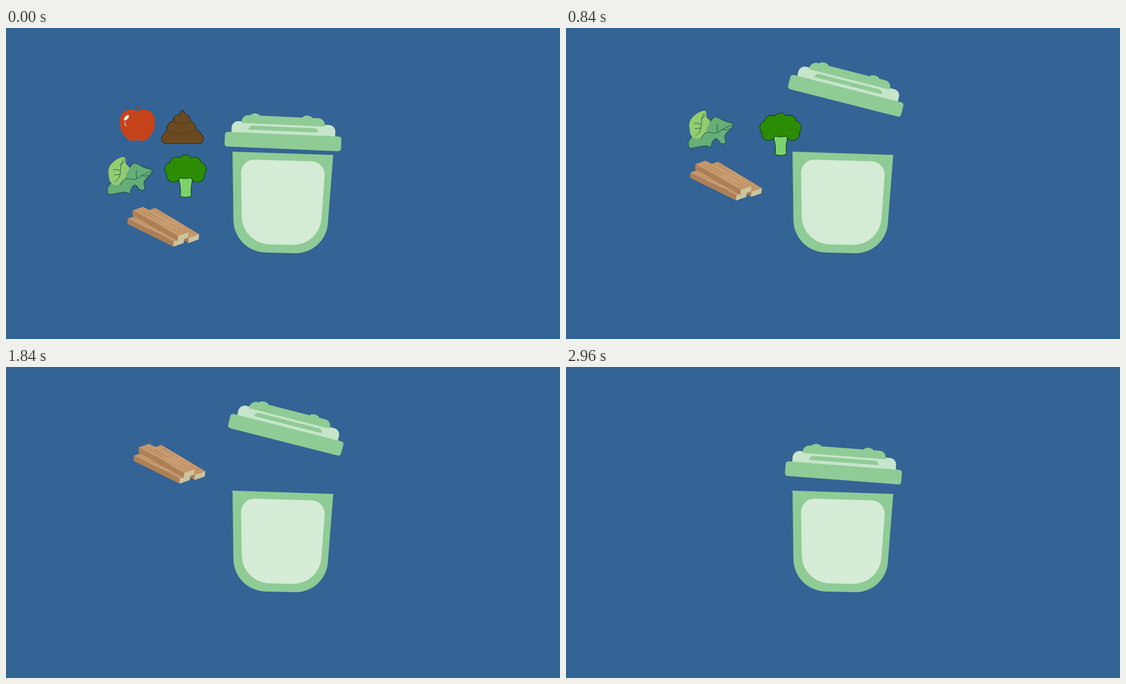
These frames come from a looping animation (998 by 561 pixels, 3 s). An HTML page with a canvas:

```html
<!DOCTYPE html>
<html lang="en">
<head>
<meta charset="utf-8">
<title>Compost bin</title>
<style>
  html, body { margin: 0; height: 100%; overflow: hidden; background: #346395; }
  canvas { display: block; }
</style>
</head>
<body>
<canvas id="stage" width="998" height="561"></canvas>
<script>
const ctx = document.getElementById("stage").getContext("2d");
const LOOP = 3000, STEP = 40, DROP_TIME = 200, DROP = 92;
const GREEN = "#8fcb95";

const mix = (a, b, k) => a + (b - a) * k;
const clamp = v => Math.max(0, Math.min(1, v));
const noise = n => { const v = Math.sin(n * 12.9898) * 43758.5453; return v - Math.floor(v); };

// ---- Path helpers ----

// Polygon of [x, y, radius] corners
function rounded(corners) {
  const path = new Path2D(), n = corners.length, [ax, ay] = corners[0], [bx, by] = corners[n - 1];
  path.moveTo((ax + bx) / 2, (ay + by) / 2);
  corners.forEach(([x, y, r = 0], i) => {
    const [nx, ny] = corners[(i + 1) % n];
    path.arcTo(x, y, nx, ny, r);
  });
  path.closePath();
  return path;
}

// Closed smooth curve through the points
function smooth(points) {
  const path = new Path2D(), n = points.length;
  path.moveTo(...points[0]);
  for (let i = 0; i < n; i++) {
    const [a, b, c, d] = [n - 1, 0, 1, 2].map(k => points[(i + k) % n]);
    path.bezierCurveTo(b[0] + (c[0] - a[0]) / 6, b[1] + (c[1] - a[1]) / 6,
                       c[0] - (d[0] - b[0]) / 6, c[1] - (d[1] - b[1]) / 6, ...c);
  }
  return path;
}

function disc(x, y, rx, ry = rx, turn = 0) {
  const path = new Path2D();
  path.ellipse(x, y, rx, ry, turn, 0, 7);
  return path;
}

function fill(path, color) {
  ctx.fillStyle = color;
  ctx.fill(path);
}

function line(path, color, width) {
  ctx.strokeStyle = color;
  ctx.lineWidth = width;
  ctx.stroke(path);
}

// Several overlapping parts with one common outline
function merged(parts, color, outline) {
  parts.forEach(part => line(part, outline, 2.2));
  parts.forEach(part => fill(part, color));
}

// ---- Things to throw away ----

function poop() {
  const tier = (x, top, bottom, w1, w2) => {
    const r = Math.min(8, w1 / 2);
    return rounded([[x - w1 / 2, top, r], [x + w1 / 2, top, r], [x + w2 / 2, bottom, 8], [x - w2 / 2, bottom, 8]]);
  };
  const tiers = [tier(318, 184, 208, 56, 89), tier(316, 169, 188, 40, 64),
                 tier(317, 157, 173, 22, 40), tier(318, 149, 166, 1, 24)];
  merged(tiers, "#6b4a21", "#3c290f");
  line(new Path2D("M303 169q14 5 26 2M290 186q24 8 49-1M297 191q18 4 34 0"), "#573b19", 0.8);
}

function apple() {
  line(new Path2D("M237.500 152L238 141M234 139.500L238 141.500L243 139.500"), "#7b4a2c", 1.8);
  const half = new Path2D("M-.5-25C6-31 31.500-34 31.500-5C31.500 14 20 23 14 26.500C10 29 5 27 -.5 26.500");
  for (const side of [-1, 1]) {
    ctx.save();
    ctx.translate(236.8, 176);
    ctx.scale(side, 1);
    fill(half, "#c5431b");
    ctx.restore();
  }
  fill(disc(217, 162, 6, 3, -0.85), "#dcefe0");
  line(new Path2D("M214 170q.5 4 2.500 7"), "#dcefe0", 1.3);
}

function lettuce() {
  const dark = smooth([[183, 297], [190, 300], [212, 296], [223, 298], [226, 289], [233, 283], [242, 292],
                       [250, 290], [249, 277], [264, 258], [250, 252], [231, 244], [220, 254], [187, 282]]);
  const light = smooth([[213, 233], [216, 245], [222, 252], [217, 263], [215, 270], [201, 283],
                        [189, 279], [185, 265], [186, 251], [198, 238]]);
  fill(dark, "#67ad77");
  line(dark, "#0f5046", 1.1);
  fill(light, "#93cc70");
  line(new Path2D("M207 283C210 270 219 271 228 273S242 264 264 258M236 271q-3-7-1-14M244 266q7 3 13-1" +
                  "M196 278C214 264 200 252 212 237M205 257q-7-3-12-1M206 264q-6 1-11 1M206 247q5-2 8-7"), "#0f5046", 0.9);
}

function broccoli() {
  const stem = new Path2D("M309 268Q316 283 314 303.500Q324 307 334 303.500Q332 283 338 268Z");
  fill(stem, "#80d672");
  line(stem, "#123f07", 1.2);
  for (let i = 0; i < 48; i++) {
    const row = i >> 2;
    fill(disc(317 + (i % 4) * 4.2 + (row % 2) * 2, 273 + row * 2.6, 0.6), "#4da648");
  }
  const lobes = [disc(323.5, 257, 23, 14)];
  for (let i = 0; i < 7; i++) {
    const a = Math.PI * (0.83 + i * 1.34 / 6);
    lobes.push(disc(323.5 + 25 * Math.cos(a), 257.5 + 16 * Math.sin(a), 12));
  }
  merged(lobes, "#2c8c04", "#123f07");
}

// Plank from its near top corner along (dx, dy), with grain on the upper face
function plank(x, y, dx, dy, seed) {
  const wx = 19, wy = -6.5, h = 9.5, ex = x + dx, ey = y + dy;
  fill(rounded([[x, y], [ex, ey], [ex, ey + h], [x, y + h]]), "#ad7f55");
  fill(rounded([[x, y], [x + wx, y + wy], [ex + wx, ey + wy], [ex, ey]]), "#c4966a");
  fill(rounded([[ex, ey], [ex + wx, ey + wy], [ex + wx - 1, ey + wy + h], [ex - 0.5, ey + h]]), "#cdc49c");
  for (let i = 0; i < 9; i++) {
    const across = (i + 0.5) / 9, from = noise(seed + i) * 0.6, to = from + 0.35;
    const grain = new Path2D();
    for (const k of [from, to]) grain.lineTo(x + dx * k + wx * across, y + dy * k + wy * across);
    line(grain, i % 3 ? "#d9b48a" : "#a3774f", 0.6);
  }
}

function wood() {
  plank(250, 331, 79, 47.5, 1);
  plank(219, 344, 83, 41, 20);
  plank(228, 329, 82, 46, 40);
}

// ---- Bin ----

function bin() {
  fill(rounded([[408, 223], [589.5, 229], [575.5, 407.5, 58], [410.5, 403.5, 59]]), GREEN);
  fill(rounded([[423, 236.7, 24], [576, 241.3, 24], [564.5, 392.5, 51], [425.5, 389, 51]]), "#d4ebd5");
}

function lid(open) {
  const box = (x1, y1, x2, y2, radii, color) => {
    const path = new Path2D();
    path.roundRect(x1, y1, x2 - x1, y2 - y1, radii);
    fill(path, color);
  };
  ctx.save();
  ctx.translate(mix(499, 504, open), mix(204.5, 122, open));
  ctx.rotate(mix(2.4, 14.3, open) * Math.PI / 180);
  box(-93.5, -33, 93.5, -10, [12, 12, 0, 0], "#c6e5ca");
  box(-76, -44.5, 74, -30, [12, 12, 0, 0], GREEN);
  for (const x of [-52, 42])
    for (const d of [-1, 0, 1]) fill(disc(x + d * 4.5, -44 - (d ? 0 : 1), 3.5), GREEN);
  box(-63, -26, 62, -18.5, [7, 7, 0, 0], GREEN);
  box(-105, -13, 105, 13.5, 5, GREEN);
  ctx.restore();
}

// ---- Motion ----

// Items pass through offsets at the shared times, then fall behind the bin
const times = [0, 560, 1080, 1400, 1840, 2200];
const items = [
  { draw: poop, drift: 0, path: [[0, 0], [183, 3.5]] },
  { draw: apple, drift: 72, path: [[0, 0], [168, 4.5]] },
  { draw: broccoli, drift: 15, path: [[0, 0], [-21, -63], [135, -86]] },
  { draw: lettuce, drift: 13, path: [[0, 0], [-13, -69], [81, -96], [255, -92.5]] },
  { draw: wood, drift: 2, path: [[0, 0], [4.5, -63], [5, -100.5], [-4.5, -148], [11, -184], [204, -184]] }
];

function offset({ path, drift }, t) {
  const last = path.length - 1;
  if (t >= times[last]) {
    const k = (t - times[last]) / DROP_TIME, [x, y] = path[last];
    return k < 1 && [x + drift * Math.sin(k * Math.PI / 2), y + DROP * k * k];
  }
  const i = times.findIndex(time => time > t);
  const k = (t - times[i - 1]) / (times[i] - times[i - 1]);
  return path[i].map((v, axis) => mix(path[i - 1][axis], v, k));
}

function render(t) {
  ctx.fillStyle = "#346395";
  ctx.fillRect(0, 0, 998, 561);
  for (const item of items) {
    const at = offset(item, t);
    if (!at) continue;
    ctx.save();
    ctx.translate(...at);
    item.draw();
    ctx.restore();
  }
  bin();
  lid(clamp(t / 240) - clamp((t - 2880) / 96));
}

ctx.lineCap = ctx.lineJoin = "round";
const start = performance.now();
function loop() {
  const elapsed = (performance.now() - start) % LOOP;
  render(Math.floor(elapsed / STEP) * STEP);
  requestAnimationFrame(loop);
}
loop();
</script>
</body>
</html>
```
